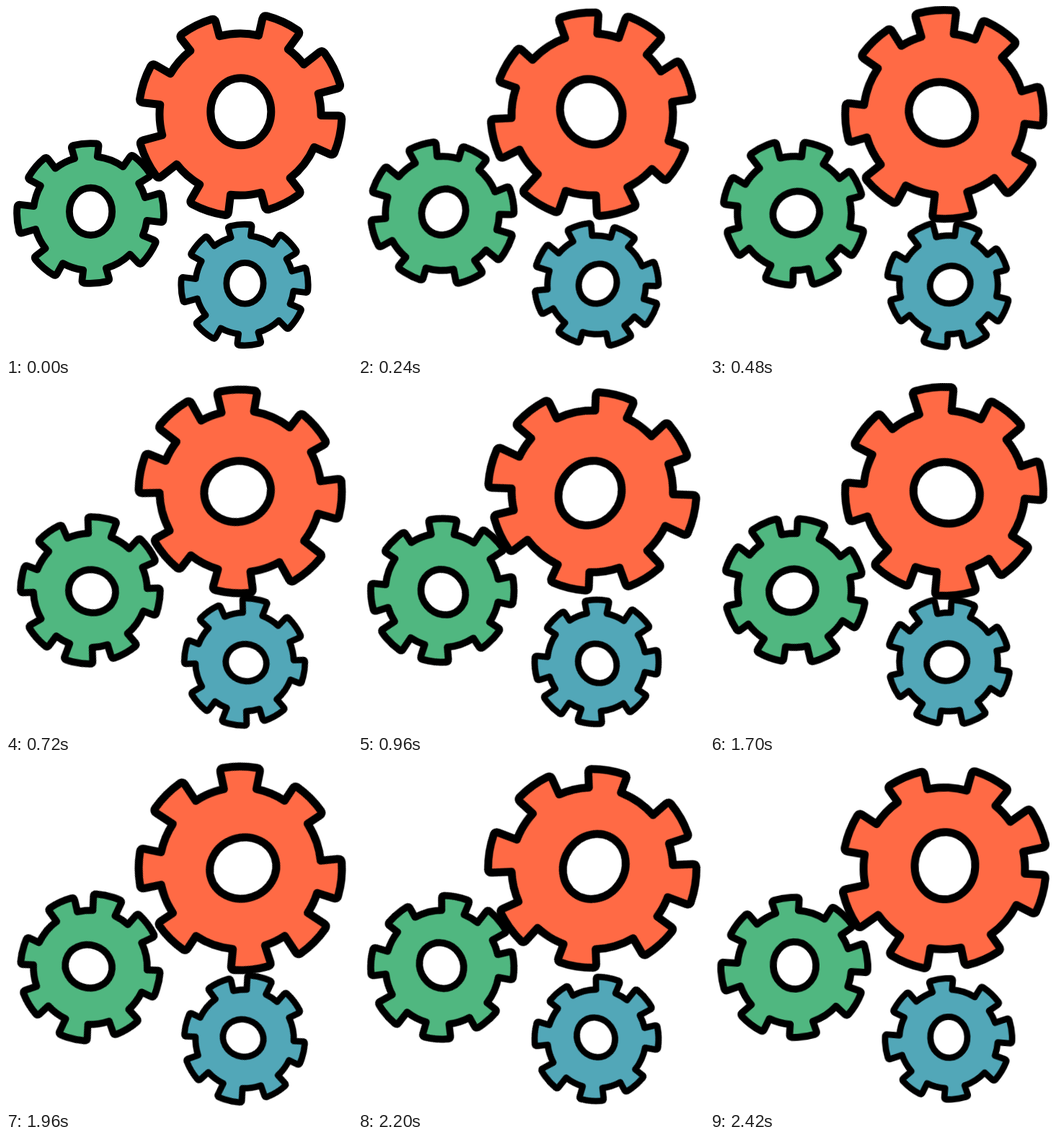
Write an HTML page that moves like this. It is 480x483 px and loops after 2.44 s.

```html
<!DOCTYPE html>
<html lang="en">
<head>
<meta charset="utf-8">
<title>Turning gears</title>
<style>
  html, body { margin: 0; width: 100%; height: 100%; overflow: hidden; background: #fff; }
  svg { display: block; width: 480px; height: 483px; }
  svg * { stroke-linejoin: round; }
</style>
</head>
<body>
<svg id="stage" viewBox="0 0 480 483"></svg>
<script>
const LOOP = 2440, HOLD = 20, STEPS = 121;
const TEETH = 8, ROOT = 112, HALF = 11.6, CORNER = 5;
const stage = document.getElementById('stage');

function add(parent, tag, attrs) {
  const el = document.createElementNS('http://www.w3.org/2000/svg', tag);
  for (const name in attrs) el.setAttribute(name, attrs[name]);
  return parent.appendChild(el);
}

// Hand-drawn irregularity: two teeth lean towards each other, tips lie on a slight oval
function tooth(i) {
  const lean = i < 4 ? 6.2 * Math.sin(i * Math.PI / 2) : 0;
  return {
    mid: 264.5 + i * 360 / TEETH + lean,
    tip: 141 - 3.5 * Math.cos(i * Math.PI / 2)
  };
}

function outline(scale, phase) {
  const at = (r, deg) => {
    const a = (deg + phase) * Math.PI / 180;
    return `${(r * scale * Math.cos(a)).toFixed(1)} ${(r * scale * Math.sin(a)).toFixed(1)}`;
  };
  const arc = (r, deg) => `A${r * scale} ${r * scale} 0 0 1 ${at(r, deg)}`;
  let d = '';
  for (let i = 0; i < TEETH; i++) {
    const { mid, tip } = tooth(i);
    const left = mid - HALF, right = mid + HALF;
    d += i ? arc(ROOT, left) : 'M' + at(ROOT, left);
    d += `L${at(tip - CORNER, left)}Q${at(tip, left)} ${at(tip, left + 2)}`;
    d += arc(tip, right - 2);
    d += `Q${at(tip, right)} ${at(tip - CORNER, right)}L${at(ROOT, right)}`;
  }
  return d + arc(ROOT, tooth(0).mid - HALF) + 'Z';
}

function gear({ x, y, scale, phase, color, line, turn }) {
  const place = add(stage, 'g', { transform: `translate(${x} ${y})` });
  const wheel = add(place, 'g', { stroke: '#000', 'stroke-width': line });
  add(wheel, 'path', { d: outline(scale, phase), fill: color });
  add(wheel, 'ellipse', {
    cx: 0.8 * scale, cy: -3.7 * scale, rx: 42 * scale, ry: 46.5 * scale, fill: '#fff'
  });
  wheel.animate([
    { transform: 'rotate(0deg)' },
    { transform: 'rotate(0deg)', offset: HOLD / LOOP, easing: `steps(${STEPS})` },
    { transform: `rotate(${turn * 360}deg)` }
  ], { duration: LOOP, iterations: Infinity });
}

gear({ x: 325, y: 150, scale: 1, phase: -21, color: '#ff6a45', line: 11, turn: -1 });
gear({ x: 117, y: 287, scale: 0.705, phase: 1, color: '#50b780', line: 9.8, turn: 1 });
gear({ x: 331, y: 386, scale: 0.61, phase: 1, color: '#52a7b8', line: 8.8, turn: 1 });
</script>
</body>
</html>
```
